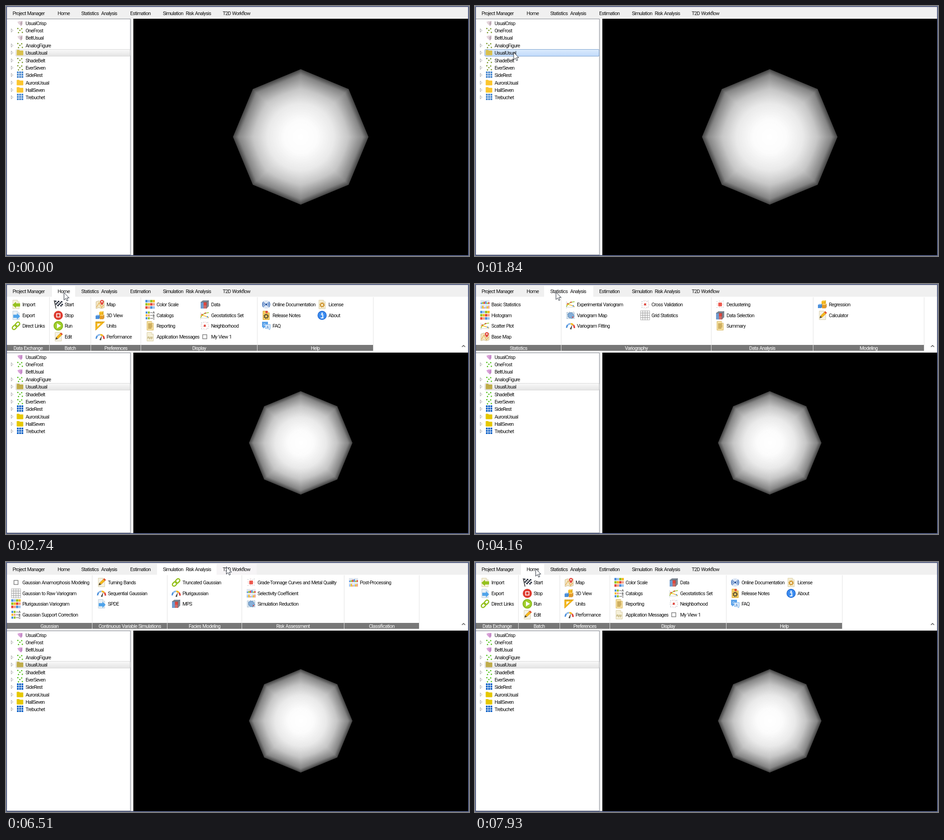
An HTML page that plays this animation: 1018x550 px, repeating every 8 s.

```html
<!DOCTYPE html>
<html lang="en">
<head>
<meta charset="utf-8">
<title>Ribbon menu tour</title>
<style>
html, body { margin: 0; width: 100%; height: 100%; overflow: hidden; background: #f0f0f0; }
svg { display: block; width: 100vw; height: 100vh; }
text { font: 11px Roboto, "Open Sans", sans-serif; letter-spacing: -.76px; word-spacing: .8px; fill: #111; white-space: pre; }
.bar { fill: #fff; text-anchor: middle; }
.tiny { font-size: 7px; letter-spacing: -.2px; }
</style>
</head>
<body>
<svg id="stage" viewBox="0 0 1018 550">
  <defs>
    <linearGradient id="idle" x2="0" y2="1"><stop stop-color="#f9f9f9"/><stop offset="1" stop-color="#e4e4e4"/></linearGradient>
    <linearGradient id="picked" x2="0" y2="1"><stop stop-color="#dcebfc"/><stop offset="1" stop-color="#c0dafb"/></linearGradient>
    <linearGradient id="hover" x2="0" y2="1"><stop stop-color="#fafbfd"/><stop offset="1" stop-color="#ebf3fd"/></linearGradient>
  </defs>
  <g id="scene"></g>
  <path id="cursor" d="M0 0V16.2L3.8 12.7 6.3 18.3 8.9 17.2 6.4 11.7H11.4Z" fill="#fff" stroke="#222a35" stroke-linejoin="round"/>
</svg>
<script>
const LOOP = 8000;
const $ = id => document.getElementById(id);

// SVG helpers
const rect = (x, y, w, h, fill, more = '') => `<rect x="${x}" y="${y}" width="${w}" height="${h}" fill="${fill}" ${more}/>`;
const path = (d, fill = 'none', stroke = 'none', w = 1) => `<path d="${d}" fill="${fill}" stroke="${stroke}" stroke-width="${w}"/>`;
const dot = (x, y, r, fill, more = '') => `<circle cx="${x}" cy="${y}" r="${r}" fill="${fill}" ${more}/>`;
const label = (x, y, s, cls = '') => `<text x="${x}" y="${y}" class="${cls}">${s}</text>`;
const at = (x, y, body) => `<g transform="translate(${x} ${y})">${body}</g>`;
const cells = (cols, rows, fn) => Array.from({ length: cols * rows }, (_, i) => fn(i % cols, Math.floor(i / cols), i)).join('');

// Ribbon icons, centred on 0,0 in a 20 px box
const RED = '#e2453c', BLUE = '#4a8fdc', GREEN = '#95c11f', GOLD = '#f5b81c', GREY = '#8b939c';
const sheet = (fill = '#f6efd4', line = '#d9cfa8') => path('M-7-9.5H3L7-5.5V9.5H-7Z', fill, line) + path('M3-9.5V-5.5H7', '#fff', line);
const cog = (y = 1, c = '#c98a1b') => `<circle cy="${y}" r="4.6" fill="none" stroke="${c}" stroke-width="2.2" stroke-dasharray="2 1.6"/><circle cy="${y}" r="3.3" fill="none" stroke="${c}" stroke-width="1.5"/>`;
const cube = (x, y, s, c, top) => rect(x, y, s, s, c) +
  path(`M${x} ${y}l${s / 3} ${-s / 3}h${s}l${-s / 3} ${s / 3}Z`, top) +
  path(`M${x + s} ${y}l${s / 3} ${-s / 3}v${s}l${-s / 3} ${s / 3}Z`, c, '#0003', .6);
const arc = (a, b, c) => {
  const p = t => `${(8.5 * Math.cos(t)).toFixed(1)} ${(4 + 8.5 * Math.sin(t)).toFixed(1)}`;
  return path(`M${p(a)}A8.5 8.5 0 0 1 ${p(b)}`, 'none', c, 3.4);
};
const HUES = [BLUE, '#9dc3ee', GREEN, GOLD, RED, '#f2a08a'];
const spots = c => cells(4, 4, (i, j, n) => dot(-7 + i * 4.6 + n % 3 * .6, -6.5 + j * 4.4 - n % 2, .7, n % 3 ? c : GREY));

const ICON = {
  import: () => sheet('#f7f2dc') + path('M-8 1 0-6V-2.5H9V4.5H0V8Z', GREEN),
  export: () => sheet('#e9f0f6', '#b9cbdc') + path('M9 2 2-5V-1.5H-6V5.5H2V9Z', '#4fa3ea'),
  link: () => `<g transform="rotate(-45)" fill="none" stroke="${GREEN}" stroke-width="2.6"><rect x="-10" y="-3.6" width="11" height="7.2" rx="3.6"/><rect x="-1" y="-3.6" width="11" height="7.2" rx="3.6"/></g>`,
  flag: () => path('M-9-9-5 9', 'none', '#333', 1.6) + cells(5, 4, (i, j) => rect(-7.6 + i * 3.3 + j * .7, -8.5 + j * 3 + i * .3, 3.3, 3, (i + j) % 2 ? '#e8e8e8' : '#1d2433')),
  stop: () => dot(0, 0, 10, '#de3b2f') + rect(-4.5, -4.5, 9, 9, '#fff') + rect(-2.8, -2.8, 5.6, 5.6, '#de3b2f'),
  run: () => dot(0, 0, 10.5, '#86b81b') + dot(0, 0, 8.6, '#a2cf2c') + path('M-3-5.5 6 0-3 5.5Z', '#fff'),
  edit: () => sheet('#f4f2e6') + path('M-6 6-4.5 1 6-9 9.5-5.5-1 4.5Z', GOLD, '#c48b16', .7) + path('M-6 6-4.5 1-1 4.5Z', '#444') + path('M4-7 6-9 9.5-5.5 7.5-3.5Z', RED),
  map: () => path('M-9-6-3-8 3-6 9-8V7L3 9-3 7-9 9Z', '#f3e7c4', '#cdb98a') + path('M-8 6-2-4 3 7 8 1', 'none', '#e3ad54', 1.4) + path('M4 2Q-1-4 0-6A4 4 0 0 1 8-6Q8-3 4 2Z', RED) + dot(4, -6, 1.7, '#fff'),
  cubes: () => cube(-2, -7, 7, GOLD, '#ffdb70') + cube(-10, 1, 7, BLUE, '#91bff0') + cube(-1, 1, 7.5, '#e59a25', '#ffd06a'),
  blocks: () => cube(-9, -6, 6, BLUE, '#91bff0') + rect(-9, 0, 6, 9, BLUE) + cube(-2, 0, 7, RED, '#f2897f') + cube(2, 3, 6, GOLD, '#ffdb70'),
  units: () => path('M-10-9H10L-10 10Z', GOLD, '#d79a12', .8) + path('M-6-5H1L-6 2Z', '#fff') + path('M-7-9v2M-3-9v2M1-9v2M5-9v2', 'none', '#9a6d0c', .8),
  gauge: () => arc(3.1, 3.9, BLUE) + arc(3.95, 4.7, '#8bb8e8') + arc(4.75, 5.5, GOLD) + arc(5.55, 6.4, RED) + path('M-1.5 7 4-3 2 8Z', '#444'),
  scale: () => cells(4, 3, (i, j) => rect(-10.5 + i * 5.3, -10 + j * 7, 4.8, 5.5, HUES[(i + j * 2) % 6])),
  abc: () => cells(2, 3, (i, j) => rect(-10 + i * 5, -8.5 + j * 6.3, 4, 4.6, HUES[(i * 2 + j * 3) % 6])) + path('M0-6H5M0 0H5M0 6.5H5', 'none', '#555', 1) + ['A', 'B', 'C'].map((c, i) => label(5.5, -4 + i * 6.6, c, 'tiny')).join(''),
  report: () => sheet('#f5dfa0', '#d8b75e') + path('M-4.5-4H4M-4.5-1H4.5M-4.5 2H4.5M-4.5 5H3', 'none', '#a98021', 1.3),
  app: () => sheet('#f6f0d8') + '<text x="-6.4" y="4" class="tiny" style="fill:#a08d42">App</text>',
  data: () => path('M-9-5-4-9H9V4L4 9H-9Z', '#7e8793') + rect(-9, -5, 6.5, 14, '#6d9bd0') + rect(-2.5, -5, 7, 7, RED) + rect(-2.5, 2, 7, 7, '#cf6a66') + path('M-9-5H4V9M4-5 9-9', 'none', '#5a6069', .8),
  curves: () => path('M-9 9V-7M-9 6H9', 'none', '#c9ced4', 1) + path('M-9 5Q-4-6 9-6', 'none', GREEN, 1.6) + path('M-9 0Q0 0 9 5', 'none', GOLD, 1.5) + dot(-6, -2, 1.5, RED) + dot(1, -5, 1.5, RED) + dot(6, 3, 1.5, BLUE),
  near: () => '<circle r="8.5" fill="none" stroke="#c6cbd1" stroke-dasharray="2 2"/>' + spots('#ef9a94') + dot(0, 0, 2.4, RED),
  box: () => rect(-4.5, -4.5, 9, 9, '#fff', 'stroke="#777" stroke-width="1.4"'),
  wave: () => dot(0, 0, 9.2, '#dde7f5') + dot(0, 0, 2.2, '#214f9c') + path('M-3.5-4Q-6 0-3.5 4M3.5-4Q6 0 3.5 4M-6-6Q-10 0-6 6M6-6Q10 0 6 6', 'none', '#2d62b3', 1.5),
  notes: () => sheet('#f6cf62', '#d8a52c') + cog(2, '#4f4630') + dot(1, -7.5, 2.6, RED),
  faq: () => path('M-9-9H4V3H-3L-7 6V3H-9Z', '#5aa2ea') + path('M-2-3H9V6H8V9L4 6H-2Z', '#d9e9fa', '#5aa2ea', .8) + '<text x="-6" y="0" class="tiny" style="fill:#fff">Q</text><text x="1" y="5" class="tiny" style="fill:#2e6fbd">A</text>',
  cog: () => sheet('#f7edcf') + cog(),
  info: () => dot(0, 0, 10, '#1f66cf') + dot(0, 0, 8.6, '#3b8cf0') + dot(0, -4.6, 1.6, '#fff') + path('M-2.5-1.5H1.5V5.5H3M-3 5.5H3', 'none', '#fff', 2),
  cluster: () => spots('#c9a3a3') + rect(-4, -4, 8, 8, '#ef5a50') + path('M-8 0H8M0-8V8', 'none', '#d9544b66', .7),
  gridcube: () => cells(3, 3, (i, j, n) => rect(-9 + i * 6.2, -8.5 + j * 6.2, 5.6, 5.6, n % 4 == 1 ? RED : n % 3 ? '#dce3ea' : '#8fb4de', 'stroke="#87919c" stroke-width=".6"')),
  goldcube: () => cells(3, 3, (i, j) => rect(-9 + i * 6.2, -8.5 + j * 6.2, 5.6, 5.6, j == 2 ? GOLD : i == 2 ? BLUE : '#e4e9ee', 'stroke="#87919c" stroke-width=".6"')),
  grid: () => cells(4, 4, (i, j) => rect(-10 + i * 5, -10 + j * 5, 5, 5, '#fafafa', 'stroke="#999" stroke-width=".8"')),
  charts: () => cells(2, 2, (i, j) => rect(-10 + i * 10.5, -9.5 + j * 10, 9.5, 9, '#dfe6ee')) + cells(6, 2, (i, j, n) => rect(-9.5 + i * 3.3, -4 + j * 10 - n * 5 % 4, 2.7, 3 + n * 5 % 4, HUES[(n * 2 + j) % 6])),
  region: () => rect(-9.5, -7, 19, 15, '#d4e2ee') + path('M-5-4Q2-9 6-2T2 6Q-8 6-5-4Z', '#87b1dc', '#4d7fb4') + spots('#6c8298') + dot(5, 4, 1.4, RED)
};

// Ribbons: group edges, group names, then columns of [icon x, "icon:Text", ...]
const RIBBON = {
  Home: { edges: [1, 95, 186, 296, 552, 807], names: ['Data Exchange', 'Batch', 'Preferences', 'Display', 'Help'], cols: [
    [22, 'import:Import', 'export:Export', 'link:Direct Links'],
    [115, 'flag:Start', 'stop:Stop', 'run:Run', 'edit:Edit'],
    [207, 'map:Map', 'cubes:3D View', 'units:Units', 'gauge:Performance'],
    [317, 'scale:Color Scale', 'abc:Catalogs', 'report:Reporting', 'app:Application Messages'],
    [437, 'data:Data', 'curves:Geostatistics Set', 'near:Neighborhood', 'box:My View 1'],
    [572, 'wave:Online Documentation', 'notes:Release Notes', 'faq:FAQ'],
    [695, 'cog:License', 'info:About']] },
  Statistics: { edges: [1, 189, 519, 743, 987], names: ['Statistics', 'Variography', 'Data Analysis', 'Modeling'], cols: [
    [22, 'charts:Basic Statistics', 'scale:Histogram', 'curves:Scatter Plot', 'map:Base Map'],
    [210, 'curves:Experimental Variogram', 'region:Variogram Map', 'gauge:Variogram Fitting'],
    [374, 'near:Cross Validation', 'grid:Grid Statistics'],
    [539, 'cluster:Declustering', 'data:Data Selection', 'report:Summary'],
    [764, 'cubes:Regression', 'edit:Calculator']] },
  Estimation: { edges: [1, 93, 666, 831, 995], names: ['Quick Interpolation', 'Kriging', 'Non Linear', 'Classification'], cols: [
    [22, 'link:Nearest Ne', 'cluster:Inverse Dis', 'cog:Moving Ave', 'run:Grid Filling'],
    [113, 'faq:Simple Kriging', 'map:Ordinary Kriging', 'cubes:Co-Kriging', 'cluster:Collocated CoKriging'],
    [230, 'notes:Disjunctive Kriging', 'cog:Bundled Indicator Kriging', 'data:Polygon Kriging'],
    [365, 'gridcube:Universal Kriging', 'cluster:Kriging with Bayesian Drift'],
    [506, 'report:Kriging with Variance of Measur', 'blocks:Kriging with local parameters', 'box:Confidence Intervals', 'goldcube:Kriging with Inequalities'],
    [687, 'flag:Uniform Conditioning', 'cog:Localized Uniform Conditioni'],
    [851, 'run:Sampling Density Variance']] },
  Simulation: { edges: [1, 189, 354, 518, 743, 908], names: ['Gaussian', 'Continuous Variable Simulations', 'Facies Modeling', 'Risk Assessment', 'Classification'], cols: [
    [22, 'box:Gaussian Anamorphosis Modeling', 'grid:Gaussian to Raw Variogram', 'scale:Plurigaussian Variogram', 'abc:Gaussian Support Correction'],
    [210, 'edit:Turning Bands', 'gauge:Sequential Gaussian', 'export:SPDE'],
    [374, 'link:Truncated Gaussian', 'gauge:Plurigaussian', 'data:MPS'],
    [539, 'cluster:Grade-Tonnage Curves and Metal Quality', 'charts:Selectivity Coefficient', 'region:Simulation Reduction'],
    [764, 'charts:Post-Processing']] },
  T2D: { edges: [1, 189, 354], names: ['Workflow', 'Results'], cols: [
    [22, 'import:Data Import', 'grid:Grid Definition', 'run:Run Workflow'],
    [210, 'map:Map', 'report:Reporting']] }
};

// Tabs: key, left, right, text x, text
const TABS = [
  ['Project', 2, 101, 14.5, 'Project Manager'], ['Home', 101, 152, 113.5, 'Home'],
  ['Statistics', 152, 260, 165.5, 'Statistics \u00a0Analysis'], ['Estimation', 260, 332, 273, 'Estimation'],
  ['Simulation', 332, 463, 345, 'Simulation \u00a0Risk Analysis'], ['T2D', 463, 551, 476.5, 'T2D Workflow']];

const TREE = ['mesh:UsualCrisp', 'points:OneFrost', 'mesh:BeltUsual', 'points:AnalogFigure', 'folder:UsualUsual', 'points:ShadeBelt',
  'points:EverSeven', 'grid:SideRest', 'folder:AuroraUsual', 'folder:HallSeven', 'grid:Trebuchet'];
const PICKED = 4, ROW = 16.37;

const SHOWN = [[0, ''], [2630, 'Home'], [4160, 'Statistics'], [5030, 'Estimation'], [5960, 'Simulation'], [6740, 'T2D'], [7760, 'Home']];

// Pointer moves: first step, last step, step count, end x, end y, eased
const START = [-5, 551];
const MOVES = [
  [1280, 1840, 8, 85, 102], [1920, 1990, 2, 112, 42], [2090, 2390, 5, 128, 22, 1], [2630, 2630, 1, 127.5, 19],
  [3470, 3850, 6, 178, 18, 1], [4480, 4800, 5, 288, 14.5, 1], [5260, 5340, 2, 380, 23], [5640, 5640, 1, 380.5, 21],
  [5810, 5810, 1, 381, 20], [6110, 6510, 6, 484.5, 10.5, 1], [6580, 6900, 5, 481, 11, 1], [6980, 7460, 7, 133, 13.5, 1], [7930, 7930, 1, 133.5, 15]];

function pointer(t) {
  let [x, y] = START;
  for (const [t0, t1, n, x1, y1, eased] of MOVES) {
    if (t < t0) break;
    const gap = (t1 - t0) / Math.max(1, n - 1);
    const k = gap ? Math.min(n, Math.floor((t - t0) / gap + 1e-6) + 1) : n;
    let u = k / n;
    if (eased) u = u * u * (3 - 2 * u);
    x += (x1 - x) * u;
    y += (y1 - y) * u;
  }
  return [x, y];
}

// Low-polygon ball: nested octagons, rounder towards the middle
const SHADES = [[0, 255], [.25, 252], [.5, 233], [.707, 199], [.924, 134], [1, 70]];
function shade(s) {
  const i = SHADES.findIndex(p => p[0] >= s) || 1;
  const [[a, u], [b, v]] = [SHADES[i - 1], SHADES[i]];
  const g = Math.round(u + (v - u) * (s - a) / (b - a));
  return `rgb(${g},${g},${g})`;
}
function octagon(r, bulge) {
  const p = (a, q) => `${(q * Math.sin(a)).toFixed(2)} ${(-q * Math.cos(a)).toFixed(2)}`;
  let d = 'M' + p(0, r);
  for (let i = 0; i < 8; i++) d += `Q${p((i + .5) * Math.PI / 4, r * bulge)} ${p((i + 1) * Math.PI / 4, r)}`;
  return d;
}
function ball(top) {
  const size = 548 - top, r = size * .2865, N = 100;
  let out = '';
  for (let i = N; i > 0; i--) {
    const s = i / N, round = Math.min(1, Math.max(0, (.92 - s) / .45));
    out += path(octagon(r * s, .924 + .155 * round), shade(s));
  }
  return at(648, top + size / 2, out);
}

function treeIcon(kind, i, s) {
  const dim = !s.ribbon;
  if (kind == 'mesh') {
    const hot = dim && s.warm && i == 0;
    return path('M-6-3-1-5 5-5 5 2 2 6-3 2Z', hot ? '#e77fca' : dim ? '#e3d3da' : '#d9a3d8') +
      path('M0-1 5-5 5 2 2 6Z', hot ? '#c93a9f' : dim ? '#bda9b4' : '#c58bc8');
  }
  if (kind == 'points') return [[-5, -4.5], [3.5, -4], [-.5, -.5], [-3.5, 4.5], [5, 4]].map(([x, y]) => dot(x, y, 1.5, dim ? (s.warm ? '#63a51f' : '#7d9a2c') : '#55c21d')).join('');
  if (kind == 'grid') return cells(3, 3, (x, y) => rect(-7 + x * 5, -8 + y * 5, 4, 4, dim ? '#4c8ad0' : '#1766c8', 'rx=".6"'));
  const fill = i == PICKED ? (dim ? '#d8c04e' : '#bfac4b') : dim ? '#fcc62f' : '#e6c800';
  return path('M-7-6H-2L-.5-4.5H6.5V5H-7Z', fill, fill, 1);
}

function tree(top, s) {
  let out = rect(1.5, top + .5, 272, 547 - top, '#fff', 'stroke="#828790"');
  TREE.forEach((item, i) => {
    const [kind, name] = item.split(':');
    const y = Math.round(top + 9.7 + ROW * i), over = s.row == i;
    const look = i == PICKED ? (over ? ['picked', '#7da2ce'] : ['idle', '#d9d9d9']) : over && ['hover', '#b8d6fb'];
    if (look) out += rect(21.5, y - 7.5, 251.5, 15, `url(#${look[0]})`, `stroke="${look[1]}" rx="2"`);
    if (kind != 'mesh') out += path(`M11.5 ${y - 4}V${y + 3.6}L15.5 ${y - .2}Z`, '#fff', '#a4a4a4');
    out += at(31, y, treeIcon(kind, i, s)) + label(43, y + 4, name);
  });
  return out;
}

function ribbon({ edges, names, cols }) {
  let out = rect(2, 28, 1014, 120, '#fff') + rect(2, 148, 1014, 3, '#f0f0f0');
  names.forEach((name, i) => {
    const a = edges[i] + 1, b = edges[i + 1];
    out += rect(a, 134, b - a, 13, '#777') + rect(b, 29, 1, 118, '#e2e2e2') + label((a + b) / 2, 145, name, 'bar');
  });
  for (const [x, ...items] of cols) items.forEach((item, i) => {
    const [icon, name] = item.split(':'), y = Math.round(45 + 23.7 * i);
    out += at(x, y, ICON[icon]()) + label(x + 14, y + 4, name);
  });
  return out + path('M1002.5 138.5 1006 135 1009.5 138.5', 'none', '#555', 1.5);
}

// Window frame: a blue-grey outer line around a dark inner one
function frame() {
  const line = (inset, c) => rect(inset, inset, 1018 - 2 * inset, 550 - 2 * inset, 'none', `stroke="${c}"`);
  return line(.5, '#7384ab') + line(1.5, '#33385a');
}

function scene(s) {
  const top = s.ribbon ? 151 : 28;
  let out = rect(0, 0, 1018, 550, '#f0f0f0');
  for (const [key, a, b, x, text] of TABS) {
    if (key == s.ribbon) out += rect(a, 4, b - a, 25, '#fff');
    else if (key == s.tab) out += rect(a, 4, b - a, 24, '#f6f4f6');
    out += label(x, 20, text);
  }
  if (s.ribbon) out += ribbon(RIBBON[s.ribbon]);
  return out + tree(top, s) + rect(280, top, 736, 548 - top, '#000') + ball(top) + frame();
}

let last = '';
function draw(t) {
  const [x, y] = pointer(t);
  const shown = SHOWN.filter(p => p[0] <= t).pop()[1];
  const top = shown ? 151 : 28;
  const row = t >= 1280 && x < 273 && y > top + 2 ? Math.floor((y - top - 2) / ROW) : -1;
  const tab = t >= 1280 && y < 28 ? TABS.find(p => x >= p[1] && x < p[2]) : null;
  const state = { ribbon: shown, row: row < TREE.length ? row : -1, tab: tab ? tab[0] : '', warm: t >= 1990 };
  const key = JSON.stringify(state);
  if (key != last) $('scene').innerHTML = scene(state);
  last = key;
  $('cursor').setAttribute('transform', `translate(${x.toFixed(1)} ${y.toFixed(1)})`);
  $('cursor').setAttribute('visibility', t < 1280 ? 'hidden' : 'visible');
}

const begin = performance.now();
function tick() {
  draw((performance.now() - begin) % LOOP);
  requestAnimationFrame(tick);
}
tick();
</script>
</body>
</html>
```
